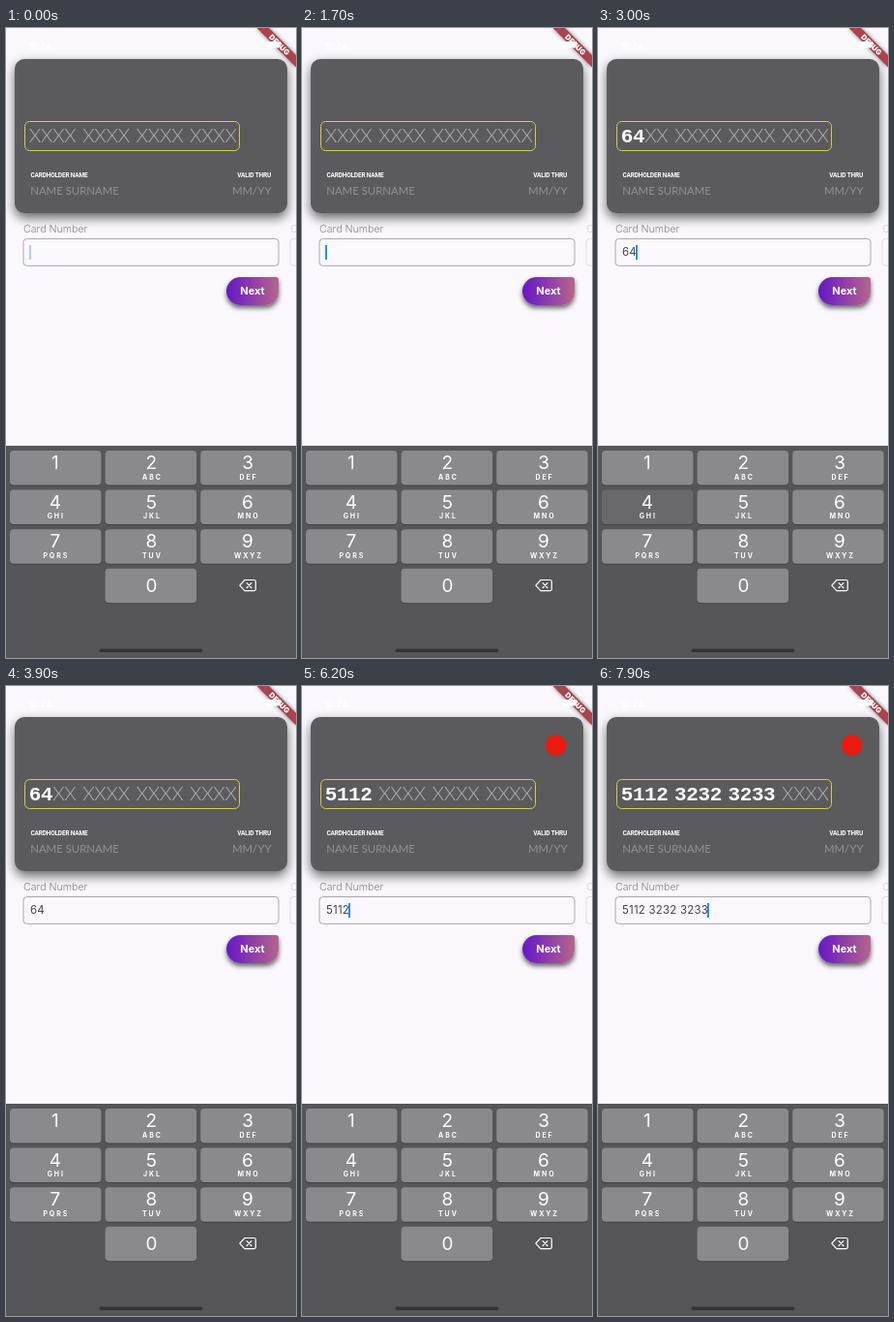
Animation, 300 px wide and 650 px high, one loop 8 s. Source, as an HTML page:

```html
<!DOCTYPE html>
<html lang="en">
<head>
<meta charset="utf-8">
<title>Card form</title>
<style>
  html, body { margin: 0; width: 100%; height: 100%; overflow: hidden; background: #faf8fc; }
  #stage { position: absolute; left: 0; top: 0; width: 300px; height: 650px; overflow: hidden; font-family: Inter, "Liberation Sans", sans-serif; }
  #stage > * { position: absolute; box-sizing: border-box; }
  svg { left: 0; top: 0; }
  .card { left: 9px; top: 32px; width: 282px; height: 159px; border-radius: 10px; background: #5b5a5c; box-shadow: 0 5px 12px rgba(0, 0, 0, .6); }
  .entry { left: 25px; top: 216.5px; height: 29px; display: flex; align-items: center; font-size: 11.5px; letter-spacing: .2px; color: #454449; white-space: pre; }
  #caret { flex: none; width: 2px; height: 15px; margin: 1px 0 0 -1px; background: #2a8cea; }
  .button { left: 228px; top: 257px; width: 54px; height: 29px; border-radius: 15px 3px 14px 15px; background: linear-gradient(90deg, #6617c8, #b5668a); box-shadow: 0 3px 5px rgba(0, 0, 0, .6); color: #fff; font: 700 11px/29px Inter, sans-serif; text-align: center; }
  .cap { font: 700 6.5px Roboto, sans-serif; letter-spacing: -.18px; fill: #fff; }
  .hint { font: 400 11.4px Lato, sans-serif; fill: #929194; }
  .blank { font: 300 20px Lato, sans-serif; fill: #b0afb2; }
  .digit { font: 700 21px "Liberation Mono", monospace; fill: #fff; }
  .num { font-size: 19px; fill: #fff; }
  .abc { font-size: 7px; font-weight: 700; letter-spacing: 1.9px; fill: #fff; }
  .label { font-size: 10.6px; font-weight: 300; }
  .banner { filter: drop-shadow(0 0 2px rgba(0, 0, 0, .5)); }
</style>
</head>
<body>
<div id="stage">
  <div class="card"></div>
  <div class="entry"><span id="entry"></span><span id="caret"></span></div>
  <div class="button">Next</div>
  <svg width="300" height="650" viewBox="0 0 300 650">
    <text x="23" y="22" font-size="9" font-weight="600" fill="#fff">10:24</text>
    <circle id="brand" cx="262.5" cy="61" r="10.7" fill="#eb1a10"/>
    <rect x="19.5" y="96.5" width="222" height="30" rx="5" fill="none" stroke="#d8cb45"/>
    <g id="cells" text-anchor="middle"></g>
    <text class="cap" x="25.5" y="154">CARDHOLDER NAME</text>
    <text class="cap" x="274" y="154" text-anchor="end">VALID THRU</text>
    <text class="hint" x="25.2" y="172">NAME SURNAME</text>
    <text class="hint" x="274.5" y="172" text-anchor="end">MM/YY</text>
    <text class="label" x="18" y="211" fill="#858389">Card Number</text>
    <text class="label" x="294" y="211" fill="#cfcdd2">Cardholder</text>
    <g fill="none">
      <rect x="18" y="217.5" width="264" height="27.8" rx="3.5" stroke="#a9a8ac"/>
      <rect x="294" y="217.5" width="264" height="27.8" rx="3.5" stroke="#dcdadf"/>
    </g>
    <rect y="431" width="300" height="219" fill="#565558"/>
    <g id="keys" text-anchor="middle"></g>
    <g transform="translate(-.5 0)" fill="none" stroke="#fff" stroke-width="1.2" stroke-linejoin="round" stroke-linecap="round">
      <path d="M247.5 569.5H257a1.8 1.8 0 0 1 1.8 1.8v7.6a1.8 1.8 0 0 1-1.8 1.8h-9.5L242.3 575.1Z"/>
      <path d="M249.6 572.7l4.8 4.8m0-4.8l-4.8 4.8"/>
    </g>
    <rect x="96.5" y="640.5" width="107" height="3.6" rx="1.8" fill="#353437"/>
    <path class="banner" d="M259.5 0H272L300 28V40.5Z" fill="#a8454d"/>
    <text transform="translate(282.8 17.2) rotate(45)" y="2.7" text-anchor="middle" font-size="7.6" font-weight="900" fill="#fff">DEBUG</text>
    <rect x="269" y="14" width="15" height="6.5" rx="2" fill="#fff"/>
  </svg>
</div>
<script>
const LOOP = 8000, FADE = 300;
const $ = id => document.getElementById(id);

// [time, digits typed so far]
const typed = [
  [0, ''], [2400, '6'], [2900, '64'], [4800, '6'], [4950, ''],
  [5300, '5'], [5500, '51'], [5700, '511'], [5900, '5112']
];
[...'32323233'].forEach((d, i) => typed.push([6290 + i * 90, typed.at(-1)[1] + d]));

// [time, caret opacity to reach, fade length]
const blinks = [
  [-120, 0, FADE], [380, 1, FADE], [880, 0, FADE], [1380, 1, FADE], [1880, 0, FADE],
  [2400, 1, 0], [3580, 0, FADE], [4080, 1, FADE], [4580, 0, FADE],
  [4800, 1, 0], [7080, 0, FADE], [7580, 1, FADE]
];

// [key, pressed at, released at]
const presses = [['6', 2380, 2580], ['4', 2880, 3160]];

function add(parent, tag, attrs, text = '') {
  const el = document.createElementNS('http://www.w3.org/2000/svg', tag);
  for (const name in attrs) el.setAttribute(name, attrs[name]);
  el.textContent = text;
  return parent.appendChild(el);
}

const cells = Array.from({ length: 16 }, (_, i) =>
  add($('cells'), 'text', { x: 30 + (i >> 2) * 55.4 + (i % 4) * 12.2, y: 117.7 }));

const letters = ['', 'ABC', 'DEF', 'GHI', 'JKL', 'MNO', 'PQRS', 'TUV', 'WXYZ'];
const keys = {};
function addKey(name, col, row, abc) {
  const x = 4 + col * 98.6, y = 436 + row * 40.6, mid = 50.8 + col * 99.6;
  add($('keys'), 'rect', { x, y: y + 1, width: 94.5, height: 35.5, rx: 4, fill: '#414043' });
  keys[name] = add($('keys'), 'rect', { x, y, width: 94.5, height: 35.5, rx: 4 });
  add($('keys'), 'text', { class: 'num', x: mid, y: y + (row < 3 ? 19 : 24) }, name);
  if (abc) add($('keys'), 'text', { class: 'abc', x: mid + 1, y: y + 29.5 }, abc);
}
letters.forEach((abc, i) => addKey(String(i + 1), i % 3, Math.floor(i / 3), abc));
addKey('0', 1, 3, '');

const latest = (steps, t) => steps.findLast(step => step[0] <= t);

function caretAt(t) {
  const [start, to, length] = latest(blinks, t);
  const p = length ? Math.min(1, (t - start) / length) : 1;
  const eased = 1 - (1 - p) ** 2;
  return to ? eased : 1 - eased;
}

let shown = null;
function showDigits(digits) {
  if (digits === shown) return;
  shown = digits;
  cells.forEach((cell, i) => {
    cell.textContent = digits[i] || 'X';
    cell.setAttribute('class', digits[i] ? 'digit' : 'blank');
  });
  $('entry').textContent = digits.replace(/(.{4})(?=.)/g, '$1 ');
  $('brand').style.display = digits.startsWith('51') ? '' : 'none';
}

function draw(t) {
  showDigits(latest(typed, t)[1]);
  $('caret').style.opacity = caretAt(t);
  for (const name in keys) {
    const down = presses.some(([key, from, to]) => key === name && t >= from && t < to);
    keys[name].setAttribute('fill', down ? '#69686b' : '#8a898c');
  }
}

const begin = performance.now();
function frame() {
  draw((performance.now() - begin) % LOOP);
  requestAnimationFrame(frame);
}
frame();
</script>
</body>
</html>
```
